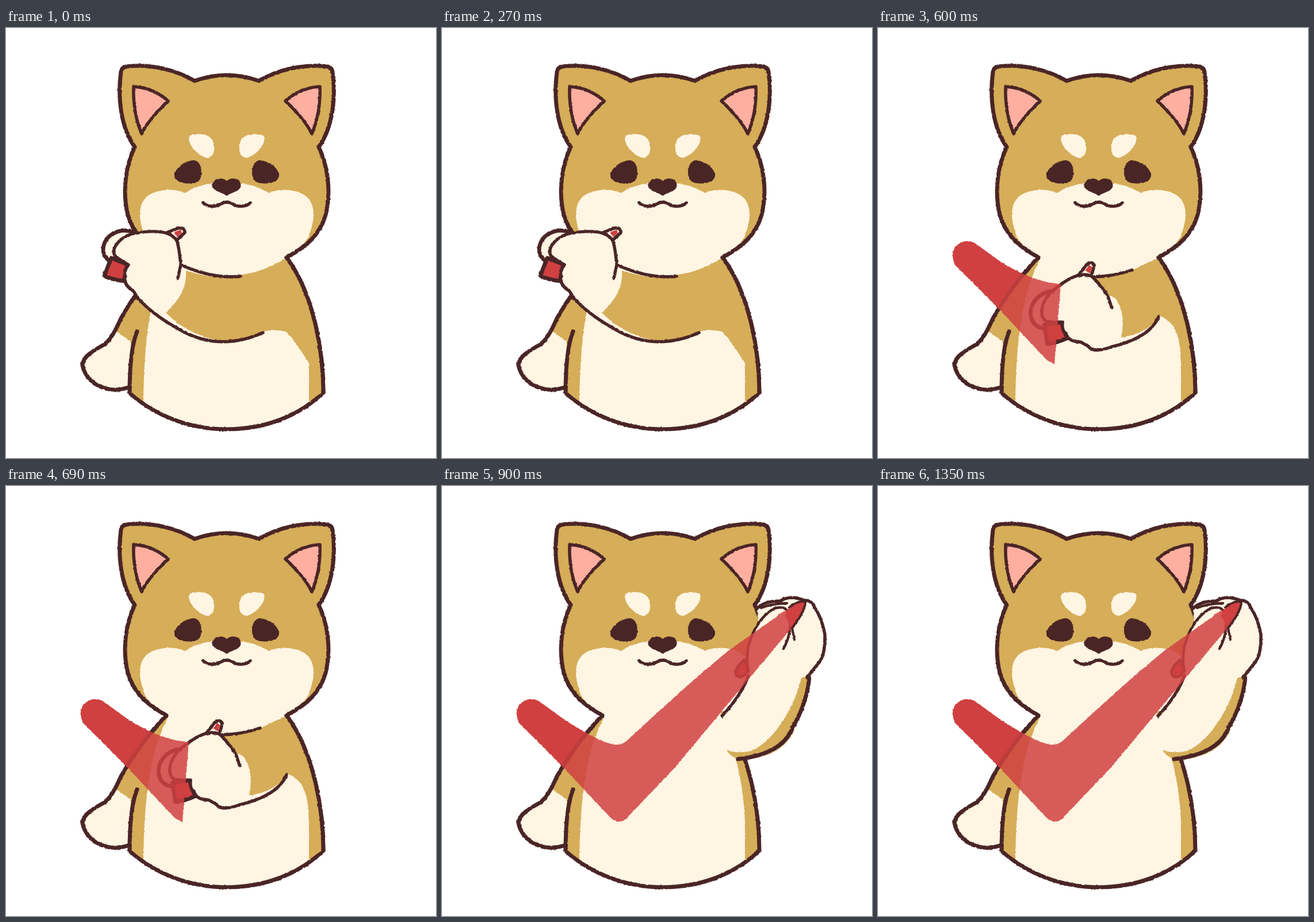
An HTML page that plays this animation: 748x748 px, repeating every 1650 ms.

```html
<!DOCTYPE html>
<html lang="en">
<head>
<meta charset="utf-8">
<title>Shiba draws a check mark</title>
<style>
  html, body { margin: 0; height: 100%; overflow: hidden; background: #fff; }
  svg { display: block; width: 100vw; height: 100vh; }
  .tan { fill: #d6ad58; }
  .cream { fill: #fef5e3; }
  .dark { fill: #4a2526; }
  .pink { fill: #ffaf9f; }
  .red { fill: #d04040; }
  .line { stroke: #4a2526; stroke-width: 7; stroke-linecap: round; stroke-linejoin: round; }
  .thin { stroke-width: 5.5; }
  .fine { stroke-width: 4.5; }
  .open { fill: none; }
  [data-step] { display: none; }
</style>
</head>
<body>
<svg viewBox="0 0 748 748">
  <defs>
    <filter id="rough" filterUnits="userSpaceOnUse" x="0" y="0" width="748" height="748" color-interpolation-filters="sRGB">
      <feTurbulence type="fractalNoise" baseFrequency=".25" numOctaves="1" seed="4"/>
      <feDisplacementMap in="SourceGraphic" scale="3" xChannelSelector="R" yChannelSelector="G"/>
    </filter>

    <path id="head" d="M279 399C245 380 222 360 212 325C202 285 208 240 224 207C199 172 194 120 200 76Q201 69 209 67C255 62 298 74 328 92Q384 72 440 92C470 74 513 62 559 67Q567 69 568 76C574 120 569 172 544 207C560 240 566 285 556 325C546 360 523 380 488 399"/>
    <path id="flank" d="M552 634C552 575 540 470 488 399"/>

    <!-- half of the face, mirrored about x = 384 -->
    <g id="side">
      <path class="pink line thin" d="M222 102C245 103 265 112 282 127C266 142 245 165 236 184C226 160 221 130 222 102Z"/>
      <path class="cream" d="M320 187C336 182 357 184 361 200C365 215 359 226 349 226C335 222 318 205 318 192Z"/>
      <path class="dark" d="M293 255C296 242 310 232 326 230C337 231 340 242 340 253C339 264 336 268 325 270C310 272 292 268 293 255Z"/>
    </g>

    <!-- fist with pen -->
    <g id="hand">
      <path class="cream line" d="M222 355C195 346 168 362 169 388Q171 399 180 405L205 400Z"/>
      <path class="cream line thin" d="M277 357L300 348Q312 347 311 356L297 369Z"/>
      <path class="red" d="M293 355L304 351 306 357 297 364Z"/>
      <path class="red line" d="M183 400L211 411 205 440Q185 438 171 431Z"/>
      <path class="cream" d="M313 422L304 412 297 370C285 350 250 352 219 358C195 366 182 385 190 397Q200 405 213 412Q203 425 208 432Q203 446 222 458L230 472 252 494 278 495Q316 462 313 422Z"/>
      <path class="open line thin" d="M299 435L304 412Q301 380 297 370C285 350 250 352 219 358C195 366 182 385 190 397Q200 405 213 412Q203 425 208 432Q203 446 222 458L230 472"/>
    </g>

    <g id="raised">
      <path class="tan" d="M484 392L498 392 488 403Z"/>
      <path class="cream" d="M488 399Q520 362 533 325C528 290 535 255 550 240L548 214Q562 198 590 199Q606 192 622 197Q640 204 660 240Q669 285 655 308L637 330C630 400 605 440 570 462Q545 472 515 475L495 460Z"/>
      <path class="tan" d="M625 334C614 380 582 440 540 460Q515 467 495 459Q502 474 525 476Q600 470 616 415Q638 375 638 330Z"/>
      <path class="open line" d="M515 475C560 470 597 455 610 420Q636 375 639 331"/>
      <path class="open line thin" d="M488 399Q520 365 533 330"/>
    </g>
  </defs>

  <g filter="url(#rough)">
    <rect width="748" height="748" fill="#fff"/>
    <path class="red mark"/>

    <!-- resting arm and torso -->
    <path class="tan" d="M279 399Q230 450 198 508L172 550 218 580 240 520Z"/>
    <path class="cream" d="M189 526L217 545 215 626Q180 636 150 615Q130 594 134 580Q142 565 172 550Z"/>
    <path class="tan" d="M279 399Q235 445 229 528Q216 570 215 635C260 675 320 698 384 698C450 698 510 675 552 634C552 575 540 470 488 399"/>
    <path class="cream" d="M284 398C262 440 240 500 239 653C285 685 330 697 384 697C440 697 490 682 527 652V583Q524 520 510 472L488 399Z"/>
    <path class="open line" d="M279 399Q232 448 200 505Q184 541 172 550C150 562 134 572 133 586Q136 605 155 619Q183 636 213 625M228 528Q215 560 215 635C260 675 320 698 384 698C450 698 510 675 552 634"/>
    <use href="#flank" class="open line"/>

    <!-- head -->
    <use href="#head" class="tan"/>
    <path class="cream" d="M243 366C228 330 226 293 265 284Q290 278 311 287Q334 272 362 270H406Q434 272 457 287Q478 278 503 284C542 293 540 330 525 366Q509 387 488 399Q440 432 384 434Q320 432 280 399Q256 386 243 366Z"/>
    <use href="#head" class="open line"/>
    <use href="#side"/>
    <use href="#side" transform="matrix(-1 0 0 1 768 0)"/>
    <path class="dark" d="M370 262Q378 261 384 266Q390 261 398 262C406 263 410 270 408 277C404 285 392 286 384 292C376 286 364 285 359 277C357 270 362 263 370 262Z"/>
    <path class="open line thin" d="M343 304C350 312 365 311 372 307Q384 299 396 307C403 311 418 312 425 304"/>

    <!-- arm positions -->
    <g data-step="0">
      <path class="tan" d="M313 422Q350 434 384 434L432 425Q465 415 488 399C520 445 540 510 548 560L550 634 527 648V583Q500 540 487 528Q465 523 447 528C420 545 375 550 340 535Q305 523 278 495Z"/>
      <path class="open line thin" d="M304 412Q360 437 408 432"/>
      <use href="#hand"/>
      <path class="open line thin" d="M228 468Q255 500 310 529Q375 562 447 530"/>
      <use href="#flank" class="open line"/>
    </g>
    <g data-step="1">
      <path class="tan" d="M347 430Q385 434 425 427L488 399C520 445 540 510 548 560L550 634 527 648V583Q505 520 470 518Q410 547 360 542L320 530Z"/>
      <path class="open line thin" d="M347 428Q384 436 425 428"/>
      <use href="#hand" transform="translate(42 37)"/>
      <path class="open line thin" d="M270 506Q300 532 345 541Q410 552 470 517"/>
      <use href="#flank" class="open line"/>
    </g>
    <g data-step="2">
      <path class="tan" d="M376 434Q415 432 445 420L488 399C520 445 540 510 548 560L550 634 527 648V583C527 545 520 510 488 500Q475 530 420 539Z"/>
      <path class="open line thin" d="M372 433Q412 432 442 421"/>
      <use href="#hand" transform="translate(372 433) rotate(-31) translate(-297 -371)"/>
      <path class="open line thin" d="M366 554Q375 566 405 555Q475 538 488 502"/>
      <use href="#flank" class="open line"/>
    </g>
    <g data-step="3">
      <use href="#raised"/>
      <path class="red line fine" d="M533 295L509 319 520 329 531 312Z"/>
      <path class="open line thin" d="M546 214Q558 197 586 200Q606 191 622 197Q632 203 637 212Q656 223 662 250Q667 290 653 310L637 330"/>
      <path class="open line fine" d="M533 322C524 285 542 232 575 230Q592 234 592 255Q590 275 575 296M578 296L591 279Q605 286 610 310"/>
    </g>
    <g data-step="4">
      <use href="#raised"/>
      <path class="red line fine" d="M526 302Q508 318 511 328Q522 340 533 320Z"/>
      <path class="open line thin" d="M547 214Q560 200 588 200Q606 189 630 199Q643 198 648 211Q661 230 666 258Q667 295 655 308L635 333"/>
      <path class="open line fine" d="M533 322C524 280 545 232 578 213Q595 208 602 218Q612 250 594 283M555 212Q575 204 600 204"/>
    </g>

    <path class="red mark" opacity=".845"/>

    <!-- pen tips -->
    <path data-step="3" class="red" stroke="#b5373a" stroke-width="4" d="M580 240Q588 217 606 216Q618 218 614 232Q606 245 592 252Z"/>
    <g data-step="4">
      <path class="red" d="M597 226Q602 209 618 202L632 200Q631 215 608 247Z"/>
      <path class="open line" style="stroke-width: 4" d="M604 211Q618 199 632 201Q632 218 609 247L613 267"/>
    </g>
  </g>
</svg>
<script>
  const start = "M205 483L134 412Q126 394 135 380Q151 365 168 374L215 408";
  const whole = start + "Q275 446 300 450Q315 451 325 440Q430 342 500 285L580 229Q600 210 613 217Q622 226 610 245L530 340 405 490 323 576Q310 591 294 578Z";
  const marks = [
    "",
    start + "L248 430 240 447 212 478Z",
    start + "Q275 444 318 445L307 585 294 578Z",
    whole,
    whole
  ];
  const cuts = [450, 600, 750, 900];
  const length = 1650;
  const steps = document.querySelectorAll("[data-step]");
  const strokes = document.querySelectorAll(".mark");
  const begin = performance.now();
  let shown;

  function show(step) {
    if (step === shown) return;
    shown = step;
    steps.forEach(el => el.style.display = +el.dataset.step === step ? "inline" : "none");
    strokes.forEach(path => path.setAttribute("d", marks[step]));
  }

  function tick(now) {
    const time = Math.max(0, now - begin) % length;
    show(cuts.filter(cut => time >= cut).length);
    requestAnimationFrame(tick);
  }
  tick(begin);
</script>
</body>
</html>
```
